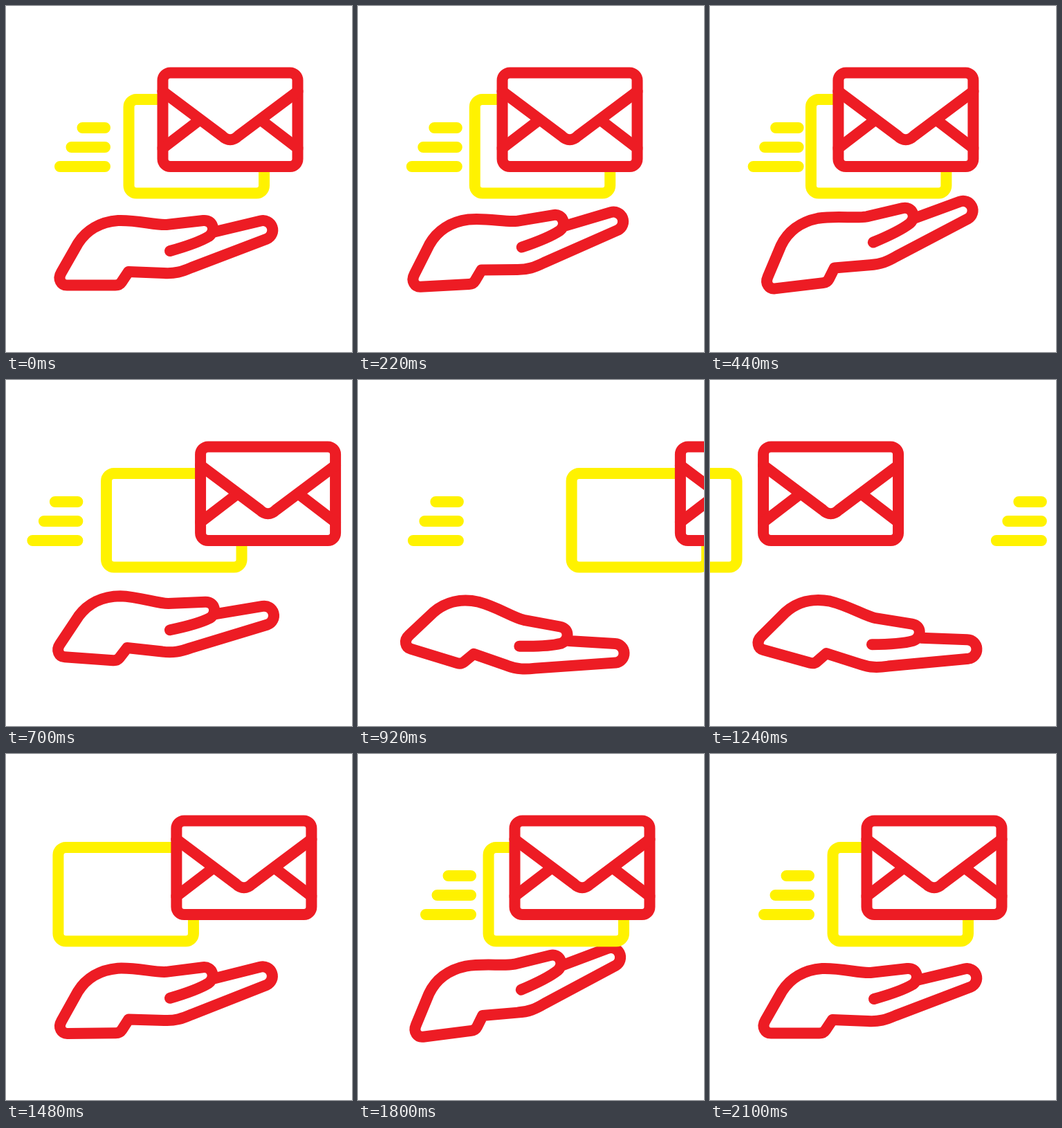
An HTML page for the animation above (2.4 s loop, 500 by 500 pixels).

```html
<!DOCTYPE html>
<html>
<head>
<meta charset="utf-8">
<style>
  html, body { margin: 0; height: 100%; overflow: hidden; background: #fff; }
  svg { display: block; width: 100vw; height: 100vh; stroke-width: 16; stroke-linecap: round; stroke-linejoin: round; }
  .red { stroke: #ed1c24; }
  .yellow { stroke: #fff200; }
</style>
</head>
<body>
<svg viewBox="0 0 500 500" fill="none">
  <path id="hand" class="red" d="M237 354C262 347 283 339 293 333C304 325 299 308.5 285 310L232 316C215 317 190 309 162 310C136 312 116 324 104 343L80 385C74 395 80 403.5 88 403.5H158Q164 403.5 167 399L177 384L228 386C244 387 254 384 268 378L377 336.5A13.8 13.8 0 0 0 368 310.5L303 326"/>
  <path id="lines" class="yellow" d="M110.5 176H143M94.5 204H143M78 232H143"/>
  <rect id="sheet" class="yellow" fill="#fff" x="177.5" y="135" width="195.5" height="135.5" rx="11"/>
  <g id="letter" class="red">
    <rect fill="#fff" x="226.5" y="96.5" width="195" height="135.5" rx="11"/>
    <path d="M226.5 123.5L312 187.5Q324 199 336 187.5L421.5 123.5M226.5 205.5L280 164.5M421.5 205.5L368 164.5"/>
  </g>
</svg>
<script>
const LOOP = 2400;
const PULL = 42, OVERSHOOT = 20, TRAVEL = 600;
// Each part with the time its return trip lands.
const parts = Object.entries({ letter: 1487, sheet: 1703, lines: 1800 });

// Progress 0..1 from start to end, slow at both ends.
function ease(t, start, end) {
  const p = Math.min(1, Math.max(0, (t - start) / (end - start)));
  return (1 - Math.cos(Math.PI * p)) / 2;
}

// Pull back, dash off to the right, come in from the left, overshoot and settle.
function slide(t, i, land) {
  const go = 487 + 153 * i;
  const far = 300 + 80 * i;
  const out = (far + PULL) * ease(t, go, go + TRAVEL + 35 * i)
    - PULL * ease(t, Math.max(0, go - TRAVEL), go);
  if (out < 280 + 75 * i) return out;
  const entry = 65 * i - 450;
  return entry + (OVERSHOOT - entry) * ease(t, land - TRAVEL, land)
    - OVERSHOOT * ease(t, land, land + 210);
}

function tilt(t) {
  return 24 * ease(t, 487, 940) - 7 * ease(t, 0, 487)
    - 26.5 * ease(t, 1160, 1688) + 9.5 * ease(t, 1688, 2040);
}

const place = (id, transform) => document.getElementById(id).setAttribute('transform', transform);
const origin = performance.now();

function draw() {
  const t = (performance.now() - origin) % LOOP;
  parts.forEach(([id, land], i) => place(id, `translate(${slide(t, i, land)} 0)`));
  place('hand', `rotate(${tilt(t)} 132 357)`);
  requestAnimationFrame(draw);
}
draw();
</script>
</body>
</html>
```
